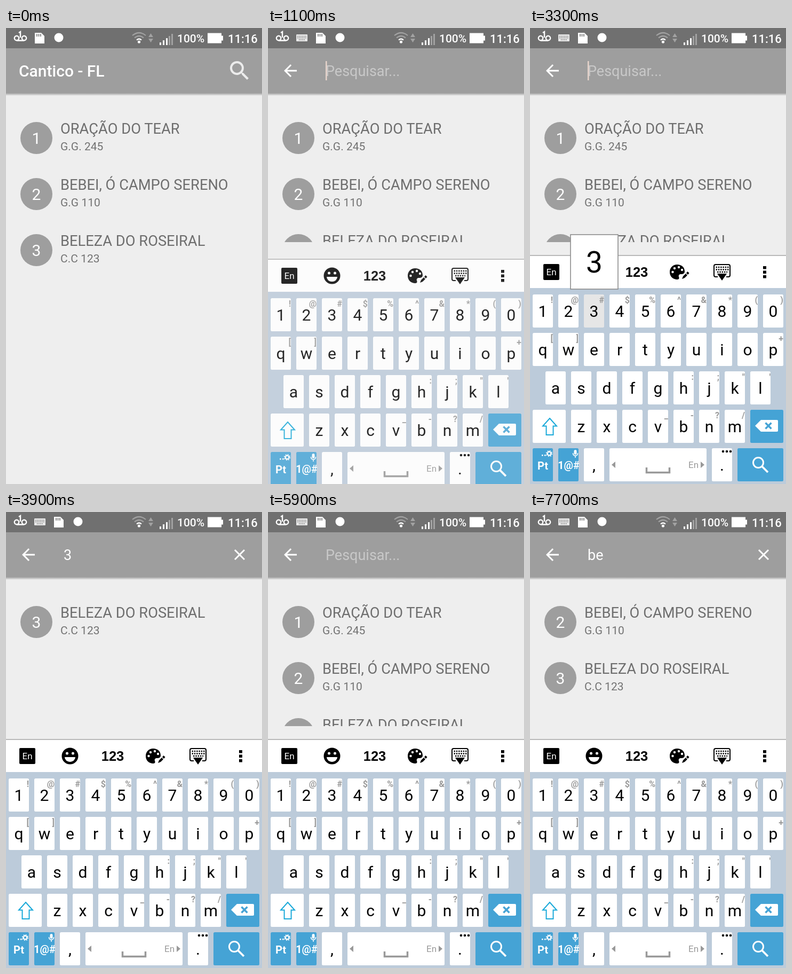
These frames come from a looping animation (480x854 px, 8 s). An HTML page:

```html
<!DOCTYPE html>
<html lang="pt">
<head>
<meta charset="utf-8">
<title>Busca na lista</title>
<style>
  html, body { margin: 0; width: 100%; height: 100%; overflow: hidden; background: #eee; }
  svg { display: block; width: 100vw; height: 100vh; font-family: Roboto, "Noto Sans", sans-serif; }
  .title { font-size: 27.3px; fill: #6e6e6e; }
  .sub { font-size: 21px; fill: #727272; }
  .num { font-size: 30px; fill: #fff; text-anchor: middle; }
  .field { font-size: 27px; fill: #fff; }
  .hint { font-size: 16px; font-weight: 700; fill: #9a9a9a; text-anchor: end; }
  .key { font-size: 30px; text-anchor: middle; }
  .cap { fill: #fff; }
  .cap.blue { fill: #45a3d5; }
  .cap.down { fill: #e6e6e6; }
  .cap.blue.down { fill: #55baf5; }
  .small { font-weight: 700; fill: #fff; text-anchor: middle; }
  .line { fill: none; stroke: #fff; }
</style>
</head>
<body>
<svg id="stage" viewBox="0 0 480 854" preserveAspectRatio="none">
  <defs>
    <linearGradient id="shade" x2="0" y2="1">
      <stop offset="0" stop-color="#000" stop-opacity=".32"/>
      <stop offset="1" stop-color="#000" stop-opacity="0"/>
    </linearGradient>
    <clipPath id="view"><rect id="viewBox" y="122" width="480" height="732"/></clipPath>
  </defs>
  <rect width="480" height="854" fill="#eee"/>
  <g id="list" clip-path="url(#view)"></g>

  <!-- app bar -->
  <rect y="38" width="480" height="84" fill="#9e9e9e"/>
  <rect y="122" width="480" height="5" fill="url(#shade)"/>
  <g id="home">
    <text x="24" y="91" font-size="30" font-weight="500" fill="#fff">Cantico - FL</text>
    <path transform="translate(414 56) scale(2)" fill="#ececec" d="M15.5 14h-.79l-.28-.27a6.5 6.5 0 1 0-.7.7l.27.28v.79l5 4.99L20.49 19zm-6 0a4.5 4.5 0 1 1 0-9 4.5 4.5 0 0 1 0 9z"/>
  </g>
  <g id="search">
    <path transform="translate(24 62) scale(1.5)" fill="#fff" d="M20 11H7.83l5.59-5.59L12 4l-8 8 8 8 1.41-1.41L7.83 13H20z"/>
    <text id="prompt" class="field" x="108" y="90" style="fill:#c8c8c8">Pesquisar...</text>
    <text id="query" class="field" x="108" y="90"></text>
    <rect id="cursor" y="62" width="2.5" height="36" fill="#e6d3cb"/>
    <path id="clear" class="line" stroke-width="3" d="M429 71l18 18m0-18l-18 18"/>
  </g>

  <!-- status bar -->
  <rect width="480" height="38" fill="#707070"/>
  <g class="line" stroke-width="2.4">
    <circle cx="20" cy="19" r="4.2"/><circle cx="34" cy="19" r="4.2"/>
    <path d="M20 23.5h14M24 9l3-2v11"/>
  </g>
  <g id="imeIcon">
    <rect x="53" y="12" width="21" height="13" rx="1" fill="#e8e8e8"/>
    <path d="M55 15.5h17M55 18.5h17M58 22h11" stroke="#707070" stroke-width="1.6" stroke-dasharray="1.6 1.4"/>
  </g>
  <g id="notes">
    <path fill="#fff" d="M54 9h12l6 6v14H54z"/>
    <path d="M58 11v5M61.500 11v5M65 11v5" stroke="#707070" stroke-width="1.6"/>
    <circle cx="99" cy="18" r="8.500" fill="#fff"/>
  </g>
  <g class="line" stroke-width="2.2" style="stroke:#a2a2a2">
    <path d="M237 14q12.500-10 25 0M241 18.500q8.500-7 17 0"/>
    <path d="M245 22.500q4.500-4 9 0" stroke="#fff"/>
  </g>
  <circle cx="249.500" cy="26" r="2.600" fill="#fff"/>
  <path fill="#a2a2a2" d="M267 17l4.500-7 4.500 7zM267 20l4.500 7 4.500-7z"/>
  <path fill="#fff" d="M288 27h3v5h-3zM294 23h3v9h-3zM300 19h3v13h-3z"/>
  <path fill="#a2a2a2" d="M305 15h3v17h-3zM310 11h3v21h-3z"/>
  <g fill="#fff" font-weight="500">
    <text x="321" y="27" font-size="21">100%</text>
    <text x="416" y="27.500" font-size="22">11:16</text>
    <path d="M378 9.500h26v5h3v9h-3v5h-26z"/>
  </g>

  <!-- keyboard -->
  <g id="board">
    <rect y="425" width="480" height="63" fill="#fff"/>
    <rect y="425" width="480" height="2" fill="#b9b9b9"/>
    <rect y="487" width="480" height="367" fill="#bccbda"/>
    <rect x="25" y="442" width="30" height="30" rx="2"/>
    <text x="40" y="463" font-size="17" fill="#fff" text-anchor="middle">En</text>
    <circle cx="120" cy="457" r="15.500"/>
    <path fill="#fff" d="M110 459h20a10 9 0 0 1-20 0z"/>
    <circle cx="114.500" cy="452" r="2.500" fill="#fff"/><circle cx="125.500" cy="452" r="2.500" fill="#fff"/>
    <text x="200" y="466" font-size="25.500" font-weight="700" text-anchor="middle" style="font-family:'Liberation Sans',Arial,sans-serif">123</text>
    <path d="M276 443c-8 0-14 6-14 14 0 9 7 14 14 14 4 0 4-3 3-5-1-3 1-5 4-5 5 0 7-2 7-5 0-8-6-13-14-13z"/>
    <g fill="#fff">
      <circle cx="267.500" cy="457" r="2.200"/><circle cx="271" cy="450" r="2.200"/>
      <circle cx="279" cy="448" r="2.200"/><circle cx="285" cy="453" r="2.200"/>
    </g>
    <path d="M285 470l2-5 5-5 3 3-5 5zM293 459l2.500-3 3 3-2.500 3z"/>
    <path class="line" stroke-width="2" style="stroke:#000" d="M352 466h-4q-3 0-3-3v-17q0-3 3-3h24q3 0 3 3v17q0 3-3 3h-4"/>
    <path d="M348.500 448h24M348.500 452.500h24M351 457h19" stroke="#000" stroke-width="2.500" stroke-dasharray="2.500 1.800"/>
    <path d="M351 460h18l-9 13z"/>
    <path d="M437 446h6v5.500h-6zM437 454.500h6v5.500h-6zM437 463h6v5.500h-6z"/>
    <g id="keys"></g>
    <g id="marks">
      <path class="line" stroke-width="2" style="stroke:#19a9d9" d="M37 731l13 14.500h-6.500V762h-13v-16.500H24z"/>
      <path id="erase" fill="#fff" d="M422 745l11-11h30q2 0 2 2v18q0 2-2 2h-30z"/>
      <path id="cross" class="line" stroke-width="3.500" d="M441.500 739.500l11 11m0-11l-11 11"/>
      <text class="small" x="24" y="827" font-size="20">Pt</text>
      <text class="small" x="72.500" y="826" font-size="19.500">1@#</text>
      <path fill="#fff" d="M22 799h2.500v2.500H22zM27 799h2.500v2.500H27z"/>
      <circle class="line" cx="36" cy="797" r="3.300" stroke-width="2.200"/>
      <circle class="line" cx="36" cy="797" r="5.200" stroke-width="1.800" stroke-dasharray="2 2.080"/>
      <rect x="82.500" y="790" width="5" height="9" rx="2.500" fill="#fff"/>
      <path class="line" stroke-width="1.500" d="M80.500 796q0 5 4.500 5t4.500-5M85 801v4"/>
      <path fill="#999" d="M160 812v12l-7-6zM320 812v12l7-6z"/>
      <text x="297" y="824" font-size="17" fill="#999">En</text>
      <path class="line" stroke-width="3.500" style="stroke:#999" d="M218.500 823v9.500h43V823"/>
      <circle cx="362" cy="793" r="2.300"/><circle cx="369" cy="793" r="2.300"/><circle cx="376" cy="793" r="2.300"/>
      <circle class="line" cx="428" cy="814" r="9.500" stroke-width="3"/>
      <path class="line" stroke-width="3.800" d="M435 821l11 11"/>
    </g>
    <g id="popup">
      <rect x=".5" y=".5" width="89" height="102" fill="#fff" stroke="#8c8c8c" stroke-width="1.600"/>
      <text id="big" x="45" y="71.500" font-size="55" text-anchor="middle"></text>
    </g>
  </g>
</svg>
<script>
const LOOP = 8000;
const $ = id => document.getElementById(id);

function add(parent, tag, attrs, text) {
  const el = document.createElementNS('http://www.w3.org/2000/svg', tag);
  for (const k in attrs) el.setAttribute(k, attrs[k]);
  if (text) el.textContent = text;
  parent.appendChild(el);
  return el;
}
const show = (el, on) => { el.style.display = on ? '' : 'none'; };

// Song list
const songs = [
  ['1', 'ORAÇÃO DO TEAR', 'G.G. 245'],
  ['2', 'BEBEI, Ó CAMPO SERENO', 'G.G 110'],
  ['3', 'BELEZA DO ROSEIRAL', 'C.C 123']
].map(([num, title, sub]) => {
  const row = add($('list'), 'g');
  add(row, 'circle', { cx: 57, cy: 206, r: 30, fill: '#9e9e9e' });
  add(row, 'text', { class: 'num', x: 57, y: 217 }, num);
  add(row, 'text', { class: 'title', x: 102, y: 198 }, title);
  add(row, 'text', { class: 'sub', x: 102, y: 229 }, sub);
  return { num, title, row };
});

// Keys
const keys = {};
function key(name, x, row, w = 38, blue = false, label = name, hint = '') {
  const y = 499 + 72 * row;
  const cap = add($('keys'), 'rect', { class: blue ? 'cap blue' : 'cap', x, y, width: w, height: 62, rx: 2.5 });
  if (hint.trim()) add($('keys'), 'text', { class: 'hint', x: x + w, y: y + 15.5 }, hint);
  if (label) add($('keys'), 'text', { class: 'key', x: x + w / 2, y: y + 42 }, label);
  keys[name] = { cap, x, y, w };
}
[
  ['1234567890', '!@#$%^&*()', 5],
  ['qwertyuiop', '[]       +', 5],
  ['asdfghjkl', '     :;"\'', 29],
  ['zxcvbnm', '   _-?/', 77]
].forEach(([letters, hints, x], row) =>
  [...letters].forEach((c, i) => key(c, x + 48 * i, row, 38, false, c, hints[i])));
key('shift', 5, 3, 62, false, '');
key('erase', 413, 3, 62, true, '');
key('lang', 5, 4, 38, true, '');
key('symbols', 53, 4, 38, true, '');
key(',', 101, 4);
key('space', 149, 4, 182, false, '');
key('.', 341, 4);
key('go', 389, 4, 86, true, '');

// Timeline: [key, down, up] and [start, text, cursor x]
const presses = [['3', 3300, 3500], ['erase', 5300, 5400], ['b', 6600, 6800], ['e', 7100, 7300]];
const edits = [[1100, '', 108], [3400, '3', 122], [5400, '', 108], [6700, 'b', 122], [7200, 'be', 136]];
const OPEN = 600, RISE = 900;

function drawList(query, t) {
  let n = 0;
  for (const s of songs) {
    const hit = s.num === query || s.title.startsWith(query.toUpperCase());
    show(s.row, hit);
    if (hit) s.row.setAttribute('transform', `translate(0 ${105 * n++})`);
  }
  $('viewBox').setAttribute('height', t < RISE ? 732 : 279);
}

function drawBar(start, query, x, t) {
  const open = t >= OPEN;
  show($('home'), !open);
  show($('search'), open);
  show($('imeIcon'), open);
  $('notes').setAttribute('transform', `translate(${open ? 36 : 0} 0)`);
  show($('prompt'), !query);
  show($('clear'), query);
  $('query').textContent = query;
  $('cursor').setAttribute('x', x);
  show($('cursor'), t < start || Math.floor((t - start) / 500) % 2 === 0);
}

function drawBoard(t) {
  const step = Math.min(5, Math.floor((t - RISE) / 100) + 1);
  const rest = (1 - step / 5) ** 2;
  show($('board'), t >= RISE);
  $('board').setAttribute('transform', `translate(0 ${44 * rest})`);
  $('board').setAttribute('opacity', 1 - rest);

  const press = presses.find(([, down, up]) => t >= down && t < up);
  const name = press && press[0];
  for (const k in keys) keys[k].cap.classList.toggle('down', k === name);
  const erasing = name === 'erase';
  $('erase').style.fill = erasing ? '#12a5d8' : '#fff';
  $('cross').style.stroke = erasing ? '#55baf5' : '#45a3d5';
  show($('popup'), name && !erasing);
  if (name && !erasing) {
    const k = keys[name];
    $('popup').setAttribute('transform', `translate(${k.x + k.w / 2 - 44.5} ${k.y - 112.5})`);
    $('big').textContent = name;
  }
}

function draw(t) {
  const [start, query, x] = edits.filter(e => t >= e[0]).pop() || edits[0];
  drawList(query, t);
  drawBar(start, query, x, t);
  drawBoard(t);
}

function tick() {
  draw(performance.now() % LOOP);
  requestAnimationFrame(tick);
}
tick();
</script>
</body>
</html>
```
